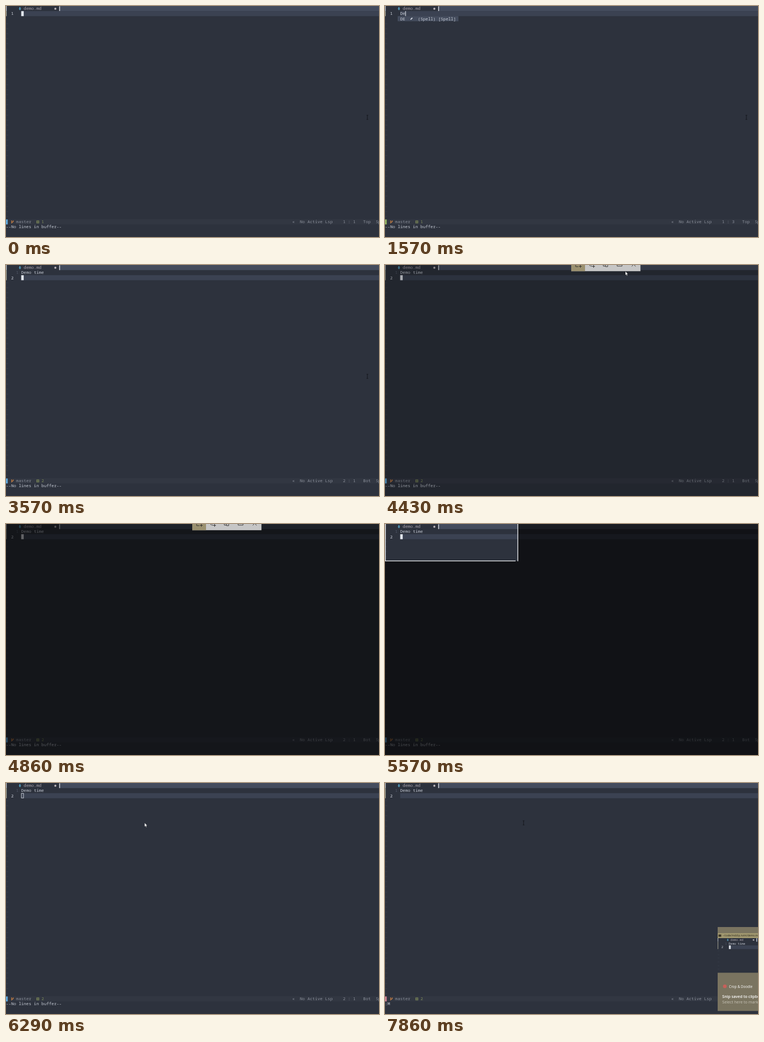
An HTML page that plays this animation: 675x417 px, repeating every 8 s.

```html
<!DOCTYPE html>
<html lang="en">
<head>
<meta charset="utf-8">
<title>Editor demo</title>
<style>
  html, body { margin: 0; width: 100%; height: 100%; overflow: hidden; background: #2d323d; }
  svg { display: block; width: 675px; height: 417px; }
  text { font: 7.64px "Noto Sans Mono", monospace; fill: #c3c8d2; white-space: pre; }
  .dim { fill: #8a8f9a; }
  .tilde { fill: #3f4654; }
  .toast text { font-family: "Open Sans", sans-serif; fill: #fff; }
  .icon { fill: none; stroke: #2b2b2b; stroke-width: .9; }
</style>
</head>
<body>
<svg viewBox="0 0 675 417">
  <defs>
    <clipPath id="thumbClip"><rect x="602" y="280" width="73" height="62.5"/></clipPath>
  </defs>

  <g id="page">
    <rect width="675" height="417" fill="#2d323d"/>
    <rect x="97" width="578" height="9.2" fill="#444c5d"/>
    <rect x="96.3" y=".6" width="1.4" height="8.6" fill="#dfe3ea"/>
    <rect id="line" x="27.5" width="648" height="9.16" fill="#3b4252"/>
    <rect width="1.2" height="9.2" fill="#c8ccd4"/>
    <rect id="signs" y="9.2" width="1.2" fill="#b0ae9a"/>
    <path d="M24.2 2h2v2.6h1.3L25.2 8l-2.3-3.4h1.3z" fill="#519aba"/>
    <circle cx="89.3" cy="4.9" r="1.9" fill="#b9b3b8"/>
    <g id="pageText"></g>
  </g>

  <rect y="385" width="675" height="9.3" fill="#323742"/>
  <rect id="mode" y="385.3" width="3.2" height="9"/>
  <g fill="none" stroke="#e08a45">
    <path d="M10.3 387v5.6M13.2 387.2v1.4q0 1.6-2.9 2.2" stroke-width="1.1"/>
  </g>
  <path d="M55.5 387.7h4.2v4.2h-4.2zM57.6 388.6v2.4M56.4 389.8h2.4" fill="none" stroke="#8c9a5c" stroke-width=".8"/>
  <g id="status"></g>
  <rect id="cursor" width="4.6" height="9"/>

  <g id="popup">
    <rect id="popupBox" y="18.3" height="9.2" fill="#444c5d"/>
    <path id="pencil" d="M0 25l.5-1.7L3 20.8l1.3 1.2L1.7 24.5z" fill="#d5d9e2"/>
  </g>

  <path id="shade" fill-rule="evenodd"/>
  <path id="frame" fill="none" stroke="#eef0f4" stroke-width="1.3"/>

  <g id="tools">
    <rect x="337" y="-14" width="125.3" height="25.2" fill="#c6c6c6"/>
    <rect x="337" y="-14" width="25" height="25.2" fill="#9b9170"/>
    <path class="icon" d="M345 -5h8v4M345 -5v8h5M353.5 0v5M351 2.5h5"/>
    <path class="icon" d="M371 2q-2-8 4-8t3 5M372 2h3M377.500 0v5M375 2.500h5"/>
    <path class="icon" d="M395 -5h8v4M395 -5v7h4M399 -1h4v4h-4z"/>
    <path class="icon" d="M420 -5h9v7h-9z"/>
    <path class="icon" d="M446.500 -4.500l7 7M453.500 -4.500l-7 7"/>
  </g>

  <g id="toast" class="toast">
    <rect x="602" y="260" width="80" height="151.500" fill="#7a7460"/>
    <rect x="602" y="271" width="80" height="9" fill="#a0976f"/>
    <rect x="603.500" y="273.500" width="5" height="4" fill="#3b3526"/>
    <text x="611" y="277.300" style="font-size:4.700px;fill:#2e2a1f">~/code/mdclip.nvim/demo.md</text>
    <g clip-path="url(#thumbClip)">
      <use href="#page" transform="translate(602 279.800) scale(.727)"/>
      <rect x="622.400" y="293.200" width="3.300" height="6.500" fill="#e1e5ec"/>
    </g>
    <circle cx="615" cy="367" r="3.300" fill="#c8605a"/>
    <text x="622.500" y="369.500" style="font-size:6.200px">Crop &amp; Doodle</text>
    <text x="610.300" y="387.800" style="font-size:7.100px;font-weight:600">Snip saved to clipboard</text>
    <text x="610.300" y="398.300" style="font-size:7.200px;fill:#c9c5b8">Select here to mark up</text>
  </g>

  <path id="beam" d="M-1.500-3.800h3M0-3.800v7.600M-1.500 3.800h3" stroke="#14161b" stroke-width=".9"/>
  <path id="arrow" d="M0 0v7l1.600-1.500 1.100 2.500 1.200-.5-1.100-2.400h2.100z" fill="#fff" stroke="#15171c" stroke-width=".4"/>
  <path id="cross" d="M-4 0h8M0-4v8" stroke="#eef0f4" stroke-width=".8"/>
</svg>

<script>
const NS = 'http://www.w3.org/2000/svg';
const CELL = 4.584, ROW = 9.163, FPS = 7, LOOP = 8000;
const $ = id => document.getElementById(id);
const set = (el, attrs) => { for (const k in attrs) el.setAttribute(k, attrs[k]); };
const show = (id, on) => set($(id), { visibility: on ? 'visible' : 'hidden' });
const move = (id, x, y) => set($(id), { transform: `translate(${x} ${y})` });

function label(parent, col, row, str, fill, cls) {
  const el = document.createElementNS(NS, 'text');
  set(el, { x: col * CELL, y: row * ROW + 7.2 });
  if (fill) el.style.fill = fill;
  if (cls) el.setAttribute('class', cls);
  el.textContent = str;
  return $(parent).appendChild(el);
}

label('pageText', 7, 0, 'demo.md', '#aaa4ad');
for (let r = 3; r < 42; r++) label('pageText', 0, r, '~', '', 'tilde');
const numOne = label('pageText', 2, 1, '1');
const numTwo = label('pageText', 2, 2, '2', '#d0d4dd');
const typed = label('pageText', 6, 1, '');

label('status', 4, 42, 'master', '', 'dim');
const added = label('status', 14, 42, '', '#7f8c5c');
label('status', 113, 42, '«', '', 'dim');
label('status', 116, 42, 'No Active Lsp', '', 'dim');
const place = label('status', 133, 42, '', '', 'dim');
const range = label('status', 141, 42, '', '', 'dim');
label('status', 146, 42, 'Sp', '', 'dim');
const command = label('status', 0, 43, '');

const word = label('popup', 0, 2, '');
const source = label('popup', 0, 2, '(Spell) [Spell]');

// All times below are ticks of 1/7 s.
const INPUT = 'Demo time';
const KEYS = [9, 11, 12, 13, 14, 15, 16, 17, 18];
const HINTS = { De: 'DE', Dem: 'DEM', Demo: 'Demo', tim: 'time', time: 'time' };
const ENTER = 20;
const MOUSE = [[29, 654, 201], [31, 435, 11.5], [34, 90, -4], [36, 0, -14],
               [37, 60, 8], [39, 240.4, 66.6], [40, 250.8, 72]];
const SHADE = [[29, 0], [31, .25], [33, .5], [35, .63], [40, .63], [42, 0]];
const TOAST = [[47, 75], [48, 45], [49, 18], [50, 4], [51, 0]];

// Linear track through [tick, ...values] points.
function track(points, n) {
  if (n <= points[0][0]) return points[0].slice(1);
  for (let i = 1; i < points.length; i++) {
    const a = points[i - 1], b = points[i];
    if (n <= b[0]) {
      const k = (n - a[0]) / (b[0] - a[0]);
      return a.slice(1).map((v, j) => v + (b[j + 1] - v) * k);
    }
  }
  return points[points.length - 1].slice(1);
}

function drawText(n) {
  const text = INPUT.slice(0, KEYS.filter(k => k <= n).length);
  const row = n >= ENTER ? 2 : 1;
  const col = row === 2 ? 0 : text.length;
  const insert = n >= 7 && n < 23;
  const cmd = n >= 53;

  typed.textContent = text;
  set(numOne, { x: (row === 1 ? 2 : 4) * CELL });
  numOne.style.fill = row === 1 ? '#d0d4dd' : '#515969';
  numTwo.style.visibility = row === 2 ? 'visible' : 'hidden';
  set($('line'), { y: row * ROW });
  set($('signs'), { height: row * ROW });

  added.textContent = row;
  place.textContent = `${row} : ${col + 1}`;
  range.textContent = row === 1 ? 'Top' : 'Bot';
  command.textContent = cmd ? (n >= 55 ? ':M' : ':') : '--No lines in buffer--';
  set($('mode'), { fill: cmd ? '#c77f90' : insert ? '#8fae62' : '#5fa6da' });

  const hollow = n >= 41 && n < 45;
  show('cursor', !cmd);
  set($('cursor'), {
    x: (6 + col) * CELL + (hollow ? .4 : 0),
    y: row * ROW + (hollow ? .4 : .1),
    width: insert ? 1.1 : hollow ? 3.9 : 4.6,
    height: hollow ? 8.3 : 9,
    fill: hollow ? 'none' : '#e1e5ec',
    stroke: hollow ? '#e1e5ec' : 'none',
    'stroke-width': .8
  });

  const last = text.split(' ').pop();
  const hint = row === 1 && HINTS[last];
  $('popup').style.display = hint ? '' : 'none';
  if (hint) {
    const start = 6 + text.length - last.length, end = start + hint.length;
    word.textContent = hint;
    set(word, { x: start * CELL });
    set(source, { x: (end + 5) * CELL });
    set($('popupBox'), { x: (start - 1) * CELL, width: (hint.length + 22) * CELL });
    move('pencil', (end + 2) * CELL, 0);
  }
}

function drawSnip(n) {
  const [x, y] = track(MOUSE, n);
  const dragging = n >= 37 && n < 42;
  const hole = dragging ? `M0 0H${x}V${y}H0z` : '';
  const [alpha] = track(SHADE, n);
  set($('shade'), { d: 'M0 0H675V417H0z' + hole, 'fill-opacity': alpha });
  show('frame', dragging && n < 41);
  set($('frame'), { d: `M.6 0V${y}H${x - 4}M${x} 0V${y + .6}` });
  show('tools', n >= 30 && n < 37);
  move('tools', 0, n === 30 ? -13 : 0);

  const kind = n < 30 || n >= 45 ? 'beam' : n < 33 || n >= 41 ? 'arrow' : n < 37 ? 'cross' : '';
  for (const id of ['beam', 'arrow', 'cross']) show(id, id === kind);
  if (kind) move(kind, x, y);
}

function frame(now) {
  const n = Math.floor((now % LOOP + 8) * FPS / 1000) % (LOOP * FPS / 1000);
  drawText(n);
  drawSnip(n);
  move('toast', track(TOAST, n)[0], 0);
  requestAnimationFrame(frame);
}
frame(performance.now());
</script>
</body>
</html>
```
